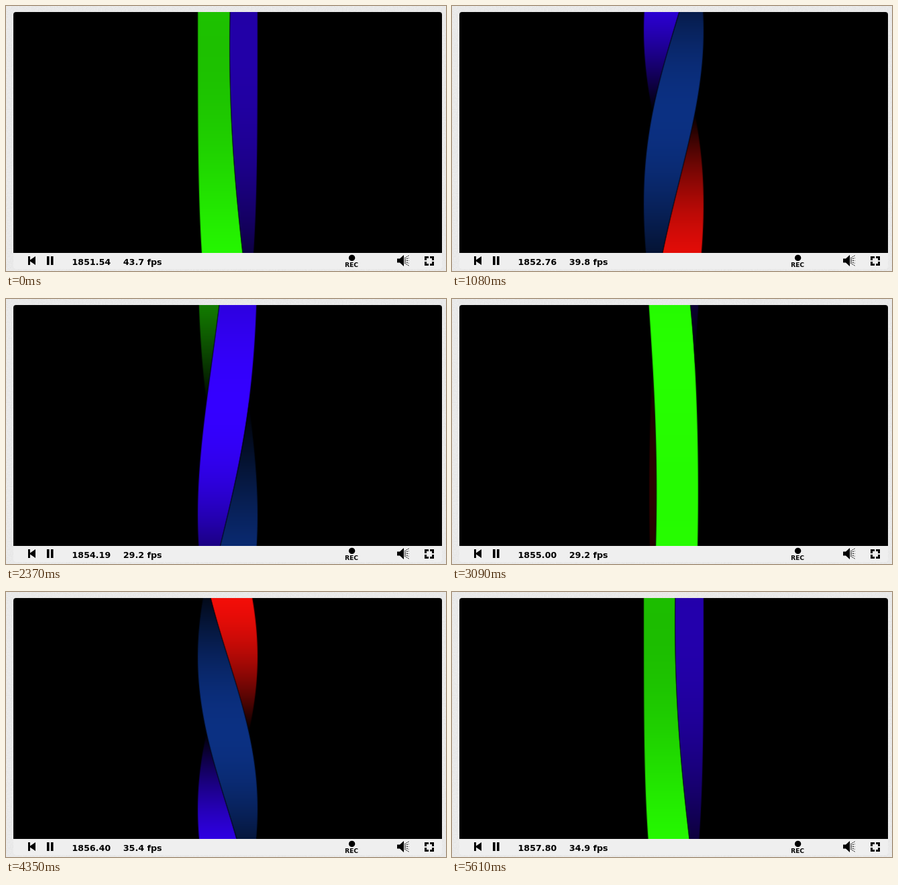
Recreate the animation shown at these times as an HTML page with a canvas. Size 657 px wide and 396 px high, loop 5.64 s.

```html
<!DOCTYPE html>
<html lang="en">
<head>
<meta charset="utf-8">
<title>Twister</title>
<style>
  html, body { margin: 0; width: 100%; height: 100%; overflow: hidden; background: #d0d0d0; }
  svg, canvas { position: absolute; display: block; }
  svg { left: 0; top: 0; }
  canvas { left: 11px; top: 9px; border-radius: 4px 4px 0 0; background: #000; }
  text { font-family: "DejaVu Sans", Verdana, sans-serif; font-weight: bold; white-space: pre; }
</style>
</head>
<body>
<svg width="657" height="396" viewBox="0 0 657 396">
  <filter id="paper" x="0" y="0" width="100%" height="100%">
    <feTurbulence type="fractalNoise" baseFrequency="0.5" numOctaves="2" seed="4"/>
    <feColorMatrix values="0.12 0 0 0 0.755  0.12 0 0 0 0.755  0.12 0 0 0 0.755  0 0 0 0 1"/>
  </filter>
  <rect width="657" height="396" fill="#d0d0d0"/>
  <rect width="657" height="396" filter="url(#paper)" style="color-interpolation-filters:sRGB"/>
  <path d="M11 369H651V389a4 4 0 0 1-4 4H15a4 4 0 0 1-4-4Z" fill="#efefef"/>

  <path d="M33 374h3v5.6l8-5.6v13l-8-5.6v5.6h-3Z"/>
  <path d="M61 374h3.6v13h-3.6ZM67 374h3.6v13h-3.6Z"/>
  <text id="clock" x="98.5" y="387" font-size="12.7"></text>
  <text id="rate" x="175" y="387" font-size="12.7"></text>

  <circle cx="516.5" cy="376.4" r="4.7"/>
  <text x="506" y="390" font-size="9.1">REC</text>

  <path d="M584 377.5h4l6-5.5v17l-6-5.5h-4Z"/>
  <path id="waves" fill="none" stroke="#000" stroke-width="1" stroke-dasharray="2 1"/>
  <path d="M625 374h6v3h-3v3h-3ZM639 374v6h-3v-3h-3v-3ZM625 388v-6h3v3h3v3ZM639 388h-6v-3h3v-3h3Z"/>
</svg>
<canvas id="view" width="640" height="360"></canvas>

<script>
const LOOP = 5640, STEP = 30, WIDTH = 640, HEIGHT = 360, RADIUS = 45;

// [loop time in ms, shader clock in s]
const clockKeys = [
  [0, 1851.54], [570, 1852.20], [1530, 1853.25], [2370, 1854.19],
  [3840, 1855.84], [4860, 1856.97], [5610, 1857.80]
];
const rates = [43.7, 39.8, 37.1, 29.2, 33.6, 35.4, 34.9];
const faces = [[247, 13, 8], [38, 255, 0], [52, 0, 255], [11, 48, 130]];

const ctx = document.getElementById("view").getContext("2d");
const clockText = document.getElementById("clock");
const rateText = document.getElementById("rate");

document.getElementById("waves").setAttribute("d",
  [-2, -1, 0, 1, 2].map(i => `M595 ${380.5 + i * 1.8}L601.5 ${380.5 + i * 3.8}`).join(""));

function clockAt(ms) {
  const i = Math.max(1, clockKeys.findIndex(key => key[0] >= ms));
  const [t0, c0] = clockKeys[i - 1], [t1, c1] = clockKeys[i];
  return c0 + (c1 - c0) * (ms - t0) / (t1 - t0);
}

function fillSpan(color, level, left, right, y) {
  if (right <= left) return;
  ctx.fillStyle = `rgb(${color.map(c => Math.round(c * level)).join(",")})`;
  ctx.fillRect(left, y, right - left, 1);
}

function drawTwister(clock) {
  ctx.clearRect(0, 0, WIDTH, HEIGHT);
  for (let y = 0; y < HEIGHT; y++) {
    const v = 1 - (y + 0.5) / HEIGHT;
    const twist = clock + 5 * Math.sin(clock + v / 2);
    faces.forEach((color, i) => {
      const angle = twist + (i - 1) * Math.PI / 2;
      const light = Math.cos(angle);
      if (light <= 0) return;
      const left = WIDTH / 2 + RADIUS * Math.sin(angle - Math.PI / 4);
      const right = WIDTH / 2 + RADIUS * Math.sin(angle + Math.PI / 4);
      // darker rim, then the lit face
      fillSpan(color, light * 0.6, left, right, y);
      fillSpan(color, light, left + 1, right - 1, y);
    });
  }
}

function render(ms) {
  const clock = clockAt(Math.min(Math.floor(ms / STEP) * STEP, LOOP - STEP));
  drawTwister(clock);
  clockText.textContent = clock.toFixed(2);
  // the frame rate refreshes once a second
  rateText.textContent = rates[Math.max(0, Math.floor(clock - 1851.08))].toFixed(1) + " fps";
}

const start = performance.now();
function tick() {
  render((performance.now() - start) % LOOP);
  requestAnimationFrame(tick);
}
tick();
</script>
</body>
</html>
```
